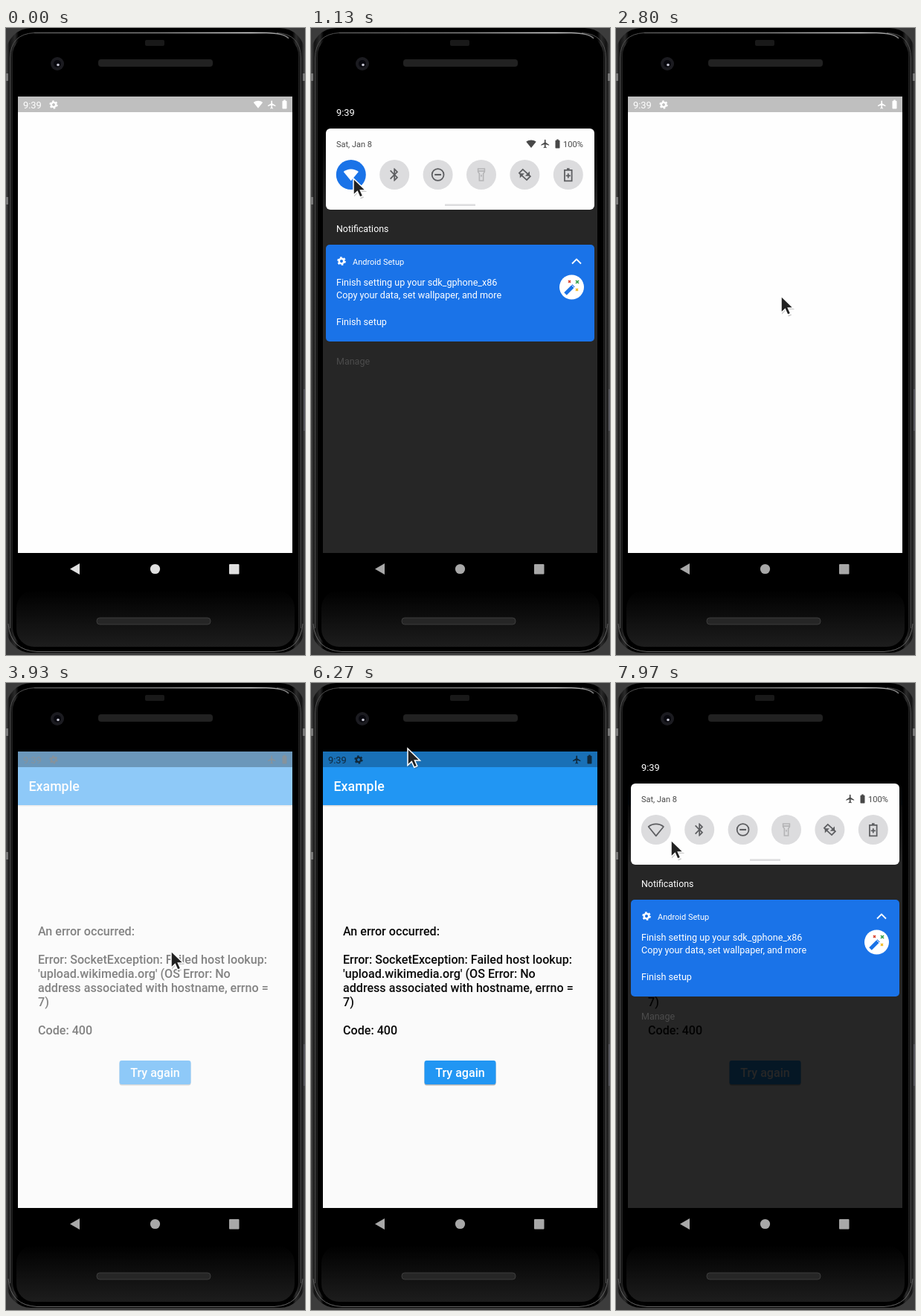
These frames come from a looping animation (402 by 842 pixels, 8 s). An HTML page:

```html
<!DOCTYPE html>
<html lang="en">
<head>
<meta charset="utf-8">
<title>Offline error</title>
<style>
html, body { margin: 0; width: 100%; height: 100%; overflow: hidden; background: #000; }
svg { display: block; width: 402px; height: 842px; font-family: Roboto, sans-serif; }
</style>
</head>
<body>
<svg id="stage" viewBox="0 0 402 842">
  <defs>
    <clipPath id="screen"><rect x="16" y="92" width="369" height="613"/></clipPath>
    <clipPath id="noteClip"><rect id="noteBox" x="20" width="361" rx="5"/></clipPath>
    <linearGradient id="side">
      <stop offset="0" stop-color="#4c4c4c"/><stop offset=".012" stop-color="#121212"/>
      <stop offset=".03" stop-color="#2c2c2c"/><stop offset=".042" stop-color="#000"/>
      <stop offset=".958" stop-color="#000"/><stop offset=".97" stop-color="#2c2c2c"/>
      <stop offset=".988" stop-color="#121212"/><stop offset="1" stop-color="#4c4c4c"/>
    </linearGradient>
    <linearGradient id="chin" x2="0" y2="1">
      <stop offset="0" stop-color="#000"/><stop offset="1" stop-color="#1d1d1d"/>
    </linearGradient>
    <linearGradient id="shine">
      <stop offset="0" stop-color="#555"/><stop offset=".5" stop-color="#868686"/>
      <stop offset=".85" stop-color="#e2e2e2"/><stop offset="1" stop-color="#777"/>
    </linearGradient>
    <linearGradient id="fade" x2="0" y2="1">
      <stop offset=".3"/><stop offset="1" stop-opacity="0"/>
    </linearGradient>
    <g id="gear" fill="none" stroke="currentColor">
      <circle r="5.6" stroke-width="4.4"/>
      <circle r="8.4" stroke-width="3.4" stroke-dasharray="4.4"/>
    </g>
    <path id="fan" d="M0 9.5 -11.5 -4.6C-5 -10 5 -10 11.5 -4.6Z"/>
    <path id="plane" d="M9 4v-2l-8-5v-5.500c0-.83-.67-1.500-1.500-1.500s-1.500.67-1.500 1.500v5.500l-8 5v2l8-2.500v5.500l-2 1.500v1.500l3.500-1 3.500 1v-1.500l-2-1.500v-5.500z"/>
    <path id="battery" d="M3.700-8H2v-2h-4v2h-1.700Q-5-8-5-6.700V8.700Q-5 10-3.700 10h7.400Q5 10 5 8.700V-6.700Q5-8 3.700-8z"/>
    <path id="bluetooth" fill-rule="evenodd" d="M5.710-4.290 0-10h-1v7.590L-5.590-7-7-5.590-1.410 0-7 5.590-5.590 7-1 2.410V10h1l5.710-5.710L1.410 0zM1-6.170l1.880 1.880L1-2.410zM2.880 4.290 1 6.170V2.410z"/>
    <g id="dnd" fill="none" stroke="currentColor" stroke-width="2">
      <circle r="9"/><path d="M-5 0H5" stroke-width="2.400"/>
    </g>
    <path id="torch" fill="none" stroke="currentColor" stroke-width="1.800"
      d="M-5-9H5V-4.500L3-1.500V9H-3V-1.500L-5-4.500ZM-5-5.500H5M0 0V3"/>
    <g id="rotate">
      <path d="M4.500-1.200-3-8-8.500-2.500-5.500.4M-4.500 1.200 3 8 8.500 2.500 5.500-.4"
        fill="none" stroke="currentColor" stroke-width="2"/>
      <path d="M7.500-5V2H.500ZM-7.500 5V-2H-.500Z"/>
    </g>
    <path id="saver" fill="none" stroke="currentColor" stroke-width="2"
      d="M-5.500-7H5.500V9.500h-11zM-2-9h4M0-2v7M-3.500 1.500h7"/>
  </defs>

  <g id="phone"></g>
  <g clip-path="url(#screen)">
    <rect x="16" y="92" width="369" height="613" fill="#fefefe"/>
    <rect x="16" y="92" width="369" height="21" fill="#bfbfbf"/>
    <g id="lightBar" color="#fff" fill="#fff"></g>
    <g id="page"></g>
    <rect id="dim" x="16" y="92" width="369" height="613" style="mix-blend-mode:multiply"/>
    <g id="shade"></g>
  </g>
  <g id="nav">
    <path d="M86 726.500 99 719v15z"/><circle cx="200.500" cy="726.500" r="6.600"/>
    <rect x="300" y="720" width="13.500" height="13.500" rx="1"/>
  </g>
  <g id="cursor">
    <path d="M1 2V24.500L6.300 19.600 9.800 27.500 14 25.700 10.500 18H18Z" fill="#555" opacity=".3"/>
    <path d="M0 0V22.500L5.300 17.600 8.800 25.300 12.800 23.500 9.400 16H16.500Z" fill="#222" stroke="#fff" stroke-width="1.500"/>
  </g>
</svg>
<script>
const LOOP = 8000;
const $ = id => document.getElementById(id);
const set = (el, attrs) => { for (const k in attrs) el.setAttribute(k, attrs[k]); };
const clamp = x => Math.max(0, Math.min(1, x));
const mix = (a, b, u) => a + (b - a) * u;
const rgb = (a, b, u) => `rgb(${a.map((v, i) => Math.round(mix(v, b[i], u)))})`;
const gray = v => `rgb(${[v, v, v].map(Math.round)})`;
const smooth = u => u * u * (3 - 2 * u);

// Value of a keyed track [[x, ...values], ...] at x
function track(keys, x, ease = u => u) {
  if (x <= keys[0][0]) return keys[0].slice(1);
  for (let i = 1; i < keys.length; i++) {
    const [a, b] = [keys[i - 1], keys[i]];
    if (x <= b[0]) {
      const u = ease((x - a[0]) / (b[0] - a[0]));
      return a.slice(1).map((v, k) => mix(v, b[k + 1], u));
    }
  }
  return keys[keys.length - 1].slice(1);
}

const text = (x, y, size, str, attrs = '') =>
  `<text x="${x}" y="${y}" font-size="${size}" ${attrs}>${str}</text>`;
const icon = (id, x, y, s, attrs = '') =>
  `<use href="#${id}" transform="translate(${x} ${y}) scale(${s})" ${attrs}/>`;
const box = (x, y, w, h, fill, attrs = '') =>
  `<rect x="${x}" y="${y}" width="${w}" height="${h}" fill="${fill}" ${attrs}/>`;

$('phone').innerHTML =
  box(0, 0, 402, 842, '#3c3c3c') +
  box(0, 0, 402, 839, 'url(#side)', 'rx="34"') +
  box(9, 9, 384, 824, '#000', 'rx="28"') +
  box(14, 755, 374, 76, 'url(#chin)', 'rx="24"') +
  `<g fill="none" stroke="#505050">
    <path d="M5.500 806V40Q6 8 38 6.500M396.500 806V40Q396 8 364 6.500"/>
    <path d="M3 800Q6 836 42 837.500H360Q396 836 399 800" stroke="#656565"/>
    <path d="M38 6.500H350Q374 7 380 14" stroke="url(#shine)" stroke-width="1.600"/>
  </g>` +
  box(0, 61, 3, 10, '#777') + box(399, 61, 3, 10, '#777') +
  box(0, 227, 3, 10, '#777') + box(400, 485, 2, 56, '#55555c') +
  box(187, 16, 26, 8, '#191919', 'rx="2"') +
  box(124, 42, 154, 10, '#212121', 'rx="4"') +
  box(122, 792, 153, 9, '#262626', 'rx="4" stroke="#484848" stroke-width=".7"') +
  `<circle cx="69" cy="48" r="9" fill="#1b1b20"/><circle cx="69" cy="48" r="5" fill="#08080e"/>
   <circle cx="70" cy="49.500" r="1.800" fill="#c8c8d4"/>`;

const statusBar = text(23, 107.5, 12.9, '9:39') + icon('gear', 64, 103, .56) +
  icon('plane', 357.5, 103, .55) + icon('battery', 374.5, 102.5, .6);
$('lightBar').innerHTML = statusBar + icon('fan', 339, 102.5, .54, 'id="barWifi"');

const message = [
  [339, 'An error occurred:'],
  [377, 'Error: SocketException: Failed host lookup:'],
  [396, "'upload.wikimedia.org' (OS Error: No"],
  [415, 'address associated with hostname, errno ='],
  [433.5, '7)'],
  [471.5, 'Code: 400']
];
$('page').innerHTML =
  box(16, 92, 369, 613, '#fafafa') +
  box(16, 164, 369, 1.5, '#c4c4c4', 'opacity=".6"') +
  box(16, 113, 369, 51, '#2196f3') + box(16, 92, 369, 21, '#1970b6') +
  `<g color="#10293c" fill="#10293c">${statusBar}</g>` +
  text(30.5, 145, 17.8, 'Example', 'font-weight="500" fill="#fff"') +
  `<g font-weight="500" fill="#0a0a0a">${message.map(([y, s]) => text(43, y, 16.1, s)).join('')}</g>` +
  box(152.5, 508.5, 96, 32, '#888', 'rx="3" opacity=".6"') +
  box(152.5, 507, 96, 32, '#2196f3', 'rx="3"') +
  box(152.5, 507, 96, 32, '#fff', 'rx="3" id="ripple"') +
  text(200.5, 529, 16.1, 'Try again', 'font-weight="500" text-anchor="middle" fill="#fff"');

const tiles = ['fan', 'bluetooth', 'dnd', 'torch', 'rotate', 'saver'];
const tile = (id, i) => {
  const x = 53.8 + 58.4 * i;
  if (!i) return `<circle id="wifiDisc" cx="${x}" cy="62" r="20"/>` +
    icon('fan', x, 62, .88, 'id="wifiFan" stroke-width="1.900" stroke-linejoin="round"');
  const ink = id === 'torch' ? '#b4b4b6' : '#5c5d60';
  return `<circle cx="${x}" cy="62" r="20" fill="#dcdcde"/>` +
    icon(id, x, 62, .88, `color="${ink}" fill="${ink}"`);
};
$('shade').innerHTML =
  box(16, 92, 369, 44, 'url(#fade)', 'id="header"') +
  text(34, 118, 12.9, '9:39', 'id="clock" fill="#fff"') +
  `<g id="panel">
    ${box(20, 0, 361, 109, '#fefefe', 'rx="6"')}
    <g fill="#484848">
      ${text(34, 25, 11, 'Sat, Jan 8')}${text(339, 25, 11.1, '100%')}
      ${icon('fan', 296, 20.5, .58, 'id="panelWifi"')}
      ${icon('plane', 315, 20.5, .57)}${icon('battery', 331.5, 20.5, .6)}
    </g>
    ${tiles.map(tile).join('')}
    ${box(180, 101.5, 41, 2.5, '#dcdcde')}
  </g>` +
  text(34, 274, 12.4, 'Notifications', 'id="heading" fill="#fff"') +
  `<g clip-path="url(#noteClip)">
    <rect id="noteBack" x="20" width="361" height="130"/>
    <g id="noteGear">${icon('gear', 0, 0, .58)}</g>
    <g id="noteText" fill="#fff">
      ${text(56, 26.5, 11, 'Android Setup')}
      ${text(34, 54.5, 12.6, 'Finish setting up your sdk_gphone_x86')}
      ${text(34, 72, 12.6, 'Copy your data, set wallpaper, and more')}
      ${text(34, 108, 12.6, 'Finish setup')}
      <path d="M351 25.500 357 19.500 363 25.500" fill="none" stroke="#fff" stroke-width="1.800"/>
      <circle cx="350.500" cy="57" r="16.500"/>
      <path d="M342 66 353 55" stroke="#1a73e8" stroke-width="5"/>
      <path d="M350.500 54.500 354 58" stroke="#fff" stroke-width="1"/>
      <path d="M346 48l3 3m0-3-3 3" stroke="#d9432f" stroke-width="1.500"/>
      <path d="M356 48l4 4m0-4-4 4" stroke="#34a04c" stroke-width="1.700"/>
      <path d="M356 59l3 3m0-3-3 3" stroke="#f2b91c" stroke-width="1.500"/>
    </g>
  </g>` +
  text(34, 451.5, 12.5, 'Manage', 'id="manage" fill="#4c4c4c"');

const open = [[480, 0], [620, .38], [800, 1], [1900, 1], [2130, .45], [2380, 0],
  [7250, 0], [7530, .38], [7740, 1]];
const panelTop = [[0, -55], [.38, 94], [.45, 106], [1, 135]];
const dimLevel = [[0, 255], [.38, 151], [.45, 134], [1, 38]];
const pointer = [[250, 130, -30], [440, 130, 95], [490, 132, 95], [750, 150, 300],
  [1050, 57, 202], [1350, 57, 202], [1720, 224, 520], [1850, 224, 520],
  [2130, 222, 367], [2300, 222, 360], [4500, 222, 360], [5000, 200, 520],
  [5850, 200, 520], [6100, 180, 388], [6270, 130, 88], [6450, 128, 71],
  [6950, 130, 95], [7250, 130, 95], [7530, 152, 245], [7680, 156, 300], [7960, 74, 211]];

function draw(t) {
  const [p] = track(open, t);
  const full = smooth(clamp((p - .5) / .4));
  const [top] = track(panelTop, p);
  const wifi = 1 - clamp((t - 1250) / 120);

  set($('page'), { opacity: clamp((t - 3630) / 600) });
  set($('ripple'), { opacity: .25 * clamp((t - 5100) / 120) * clamp((5500 - t) / 250) });
  set($('barWifi'), { opacity: t < 1400 ? 1 : 0 });
  set($('dim'), { fill: gray(track(dimLevel, p)[0]) });

  set($('shade'), { visibility: p > 0 ? 'visible' : 'hidden' });
  set($('header'), { height: Math.max(0, top + 109 - 92), opacity: clamp(p * 5) });
  set($('panel'), { transform: `translate(0 ${top})` });
  for (const id of ['clock', 'heading', 'manage']) set($(id), { opacity: full });
  set($('wifiDisc'), { fill: rgb([220, 220, 222], [26, 115, 232], wifi) });
  set($('wifiFan'), wifi > .5 ? { fill: '#fff', stroke: 'none' } : { fill: 'none', stroke: '#5c5d60' });
  set($('panelWifi'), { opacity: t < 1400 ? 1 : 0 });

  const y = mix(top + 111, 291, full);
  set($('noteBox'), { y, height: mix(29, 130, full) });
  set($('noteBack'), { y, fill: rgb([254, 254, 254], [26, 115, 232], full) });
  set($('noteGear'), {
    transform: `translate(41 ${y + mix(14.5, 22, full)})`,
    color: rgb([92, 93, 96], [255, 255, 255], full)
  });
  set($('noteText'), { transform: `translate(0 ${y})`, opacity: full });

  set($('nav'), { fill: gray(mix(224, 168, clamp((t - 480) / 320))) });
  const [cx, cy] = track(pointer, t, smooth);
  set($('cursor'), { transform: `translate(${cx} ${cy})`, visibility: t < 250 ? 'hidden' : 'visible' });
}

const start = performance.now();
function tick() {
  draw((performance.now() - start) % LOOP);
  requestAnimationFrame(tick);
}
tick();
</script>
</body>
</html>
```
